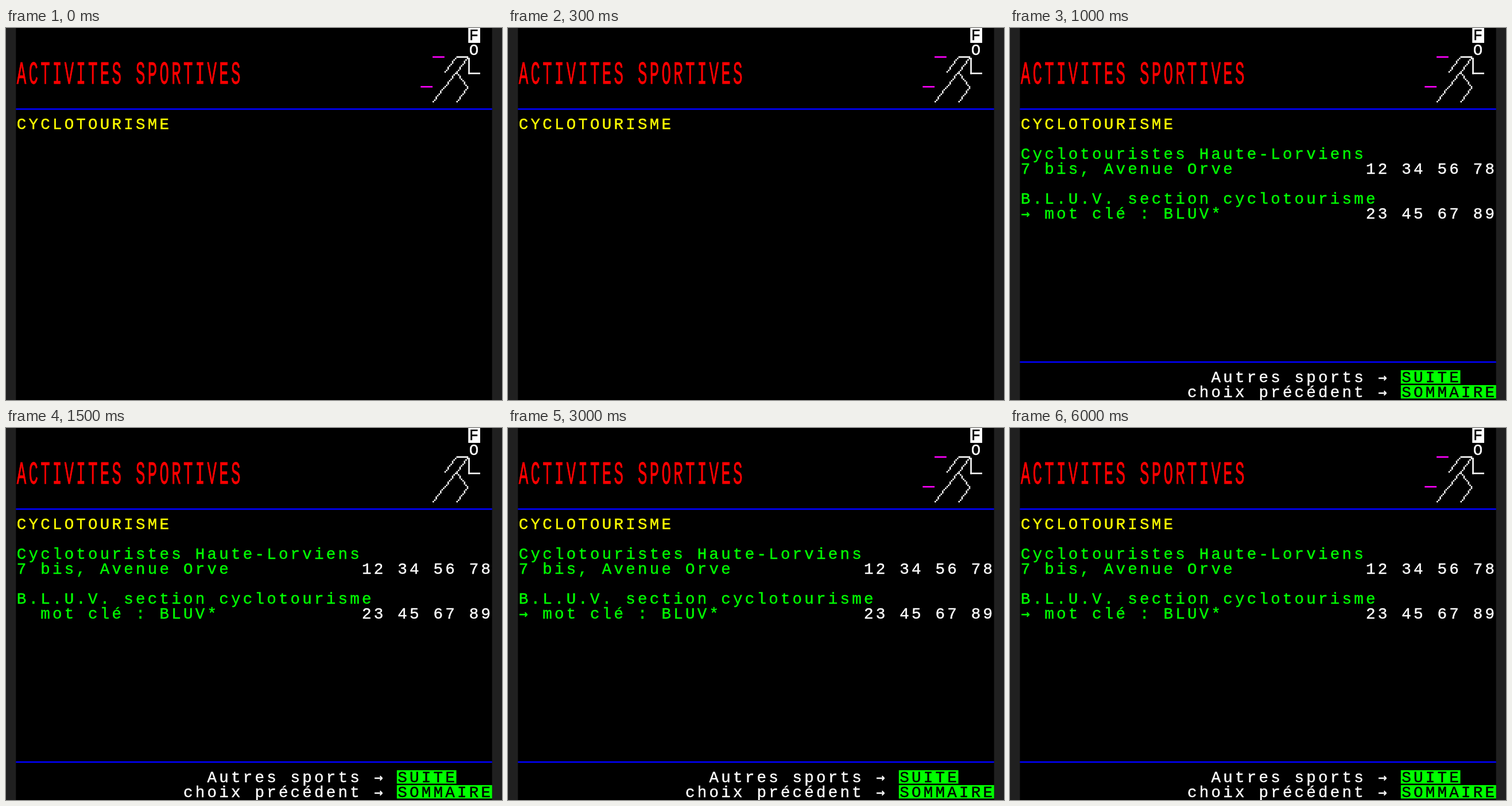
Animation of 864 by 648 pixels, one loop 8000 ms. Source, as an HTML page:

```html
<!DOCTYPE html>
<html lang="fr">
<head>
<meta charset="utf-8">
<title>Activités sportives</title>
<style>
  html, body { margin: 0; width: 100%; height: 100%; overflow: hidden; background: #202020; }
  svg { display: block; width: 864px; height: 648px; }
  text {
    font: 27.5px "Liberation Mono", "DejaVu Sans Mono", monospace;
    text-anchor: middle;
    stroke-width: .45px;
  }
  .arrow text { font: 25.5px "DejaVu Sans Mono", monospace; }
</style>
</head>
<body>
<svg id="screen" viewBox="0 0 864 648"></svg>
<script>
const DOT = 2.592, CELL_W = 8 * DOT, CELL_H = 10 * DOT;
const LEFT = (864 - 40 * CELL_W) / 2;
const LOOP = 8000;
const RED = '#f00', YELLOW = '#ff0', GREEN = '#0f0', BLUE = '#00f', MAGENTA = '#f0f', WHITE = '#fff';

const screen = document.getElementById('screen');

function add(parent, tag, attrs) {
  const node = document.createElementNS('http://www.w3.org/2000/svg', tag);
  for (const key in attrs) node.setAttribute(key, attrs[key]);
  return parent.appendChild(node);
}

// One character per terminal cell, centred in it.
function write(parent, col, row, string, color, tall) {
  const xs = [...string].map((_, i) => LEFT + (col + i + .5) * CELL_W - .7);
  const baseline = row * CELL_H + (tall ? 19.2 : 20.9);
  add(parent, 'text', {
    x: xs.join(' '), y: 0, fill: color, stroke: color,
    transform: `translate(0 ${baseline}) scale(1 ${tall ? 2 : 1})`
  }).textContent = string;
}

function arrow(parent, col, row, color) {
  const group = add(parent, 'g', { class: 'arrow' });
  write(group, col, row, '→', color);
  return group;
}

// Rectangle measured in terminal dots (8 x 10 per cell).
function dots(parent, x, y, w, h, color) {
  add(parent, 'rect', { x: LEFT + x * DOT, y: y * DOT, width: w * DOT, height: h * DOT, fill: color });
}

function diagonal(parent, col, row, rising) {
  for (let i = 0; i < 10; i++) {
    const step = Math.round(i * 7 / 9);
    dots(parent, col * 8 + (rising ? 7 - step : step), row * 10 + i, 1, 1, WHITE);
  }
}

function inverse(parent, col, row, string, color, height) {
  dots(parent, col * 8, row * 10, string.length * 8, height, color);
  write(parent, col, row, string, '#000');
}

// Hard on/off switching from [time, visible] steps.
function toggle(node, steps) {
  const frames = steps.map(([time, on]) => ({ offset: time / LOOP, opacity: on, easing: 'step-end' }));
  frames.push({ offset: 1, opacity: steps[steps.length - 1][1] });
  node.animate(frames, { duration: LOOP, iterations: Infinity }).startTime = 0;
}

const header = add(screen, 'g');
const body = add(screen, 'g');
dots(header, 0, 0, 320, 250, '#000');
write(header, 0, 3, 'ACTIVITES SPORTIVES', RED, true);
dots(header, 0, 54, 320, 1, BLUE);
write(header, 0, 6, 'CYCLOTOURISME', YELLOW);

// Runner
inverse(header, 38, 0, 'F', WHITE, 10);
write(header, 38, 1, 'O', WHITE);
dots(header, 296, 19, 8, 1, WHITE);
dots(header, 304, 20, 1, 11, WHITE);
dots(header, 304, 30, 8, 1, WHITE);
for (const [col, row] of [[36, 2], [37, 2], [36, 3], [35, 4], [37, 4]]) diagonal(header, col, row, true);
diagonal(header, 37, 3, false);

// Listing and footer
write(body, 0, 8, 'Cyclotouristes Haute-Lorviens', GREEN);
write(body, 0, 9, '7 bis, Avenue Orve', GREEN);
write(body, 29, 9, '12 34 56 78', WHITE);
write(body, 0, 11, 'B.L.U.V. section cyclotourisme', GREEN);
write(body, 2, 12, 'mot clé : BLUV*', GREEN);
write(body, 29, 12, '23 45 67 89', WHITE);
dots(body, 0, 224, 320, 1, BLUE);
write(body, 16, 23, 'Autres sports', WHITE);
arrow(body, 30, 23, WHITE);
inverse(body, 32, 23, 'SUITE', GREEN, 9);
write(body, 14, 24, 'choix précédent', WHITE);
arrow(body, 30, 24, WHITE);
inverse(body, 32, 24, 'SOMMAIRE', GREEN, 9);

// Blinking marks
const speedLines = add(screen, 'g');
dots(speedLines, 280, 19, 8, 1, MAGENTA);
dots(speedLines, 272, 39, 8, 1, MAGENTA);

const blinkSteps = [[0, 1], [500, 0], [1000, 1], [1500, 0], [3000, 1]];
toggle(body, [[0, 0], [500, 1]]);
toggle(speedLines, blinkSteps);
toggle(arrow(body, 0, 12, GREEN), blinkSteps);
</script>
</body>
</html>
```
